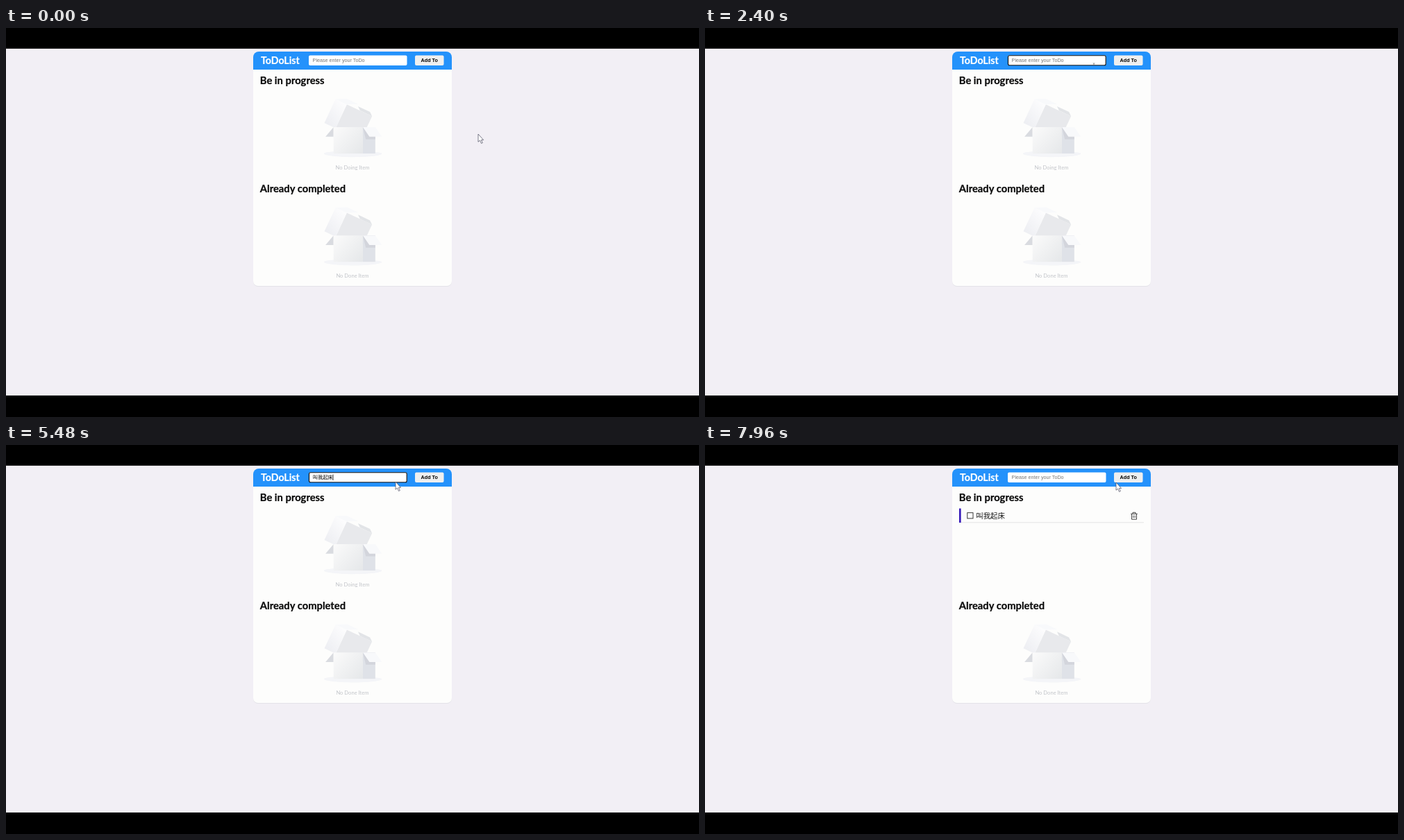
Animation, 998 px wide and 561 px high, one loop 8 s. Source, as an HTML page:

```html
<!DOCTYPE html>
<html lang="en">
<head>
<meta charset="utf-8">
<title>ToDoList</title>
<style>
  html, body { margin: 0; width: 100%; height: 100%; overflow: hidden; background: #000; }
  svg { display: block; width: 100vw; height: 100vh; }
  .title { font: 700 14.2px Lato, sans-serif; fill: #fff; stroke: #fff; stroke-width: .2; }
  .heading { font: 700 14.75px Lato, sans-serif; fill: #0a0a0a; stroke: #0a0a0a; stroke-width: .2; }
  .empty { font: 7.6px Lato, sans-serif; fill: #c3c5ca; text-anchor: middle; }
  .field { font: 7.2px "Liberation Sans", "Noto Sans CJK SC", "Noto Sans CJK", sans-serif; }
  .button { font: 700 7.2px "Liberation Sans", sans-serif; text-anchor: middle; }
  .task { font: 500 10.4px "Noto Sans CJK SC", "Noto Sans CJK", sans-serif; fill: #111; }
</style>
</head>
<body>
<svg viewBox="0 0 998 561">
  <defs>
    <linearGradient id="lidSide" x1=".39" y1="0" x2=".61" y2="1">
      <stop stop-color="#fcfcfd"/><stop offset="1" stop-color="#eeeff3"/>
    </linearGradient>
    <linearGradient id="front" x1="0" y1=".095" x2="1" y2=".905">
      <stop stop-color="#fafafa"/><stop offset="1" stop-color="#e6e8ea"/>
    </linearGradient>
    <clipPath id="inside"><rect x="437" y="40.5" width="140" height="12.5"/></clipPath>
    <g id="box">
      <path d="M39.5 86C61.3 86 79 83.9 79 81.3S57.3 78 35.5 78 0 78.8 0 81.3 17.7 86 39.5 86Z" fill="#f4f5f8"/>
      <path d="M13 45V58H2Z" fill="#d9dbe0"/>
      <g transform="translate(34.5 31.5) scale(-1 1) rotate(-25) translate(-27.5 -21.5)">
        <path d="M0 7H18L23 3H5Z" fill="#e2e4e7"/>
        <path d="M0 7H38V43H0Z" fill="#e8e9ec"/>
        <path d="M38 7H55V43H38Z" fill="url(#lidSide)"/>
        <path d="M55 7H38L24 0H41Z" fill="#f8f9fb"/>
      </g>
      <path d="M13 45H53V81H13Z" fill="url(#front)"/>
      <path d="M53 45H70V81H53Z" fill="#dfe2e8"/>
      <path d="M53 45H70V61.5H57Z" fill="#d3d5dc"/>
      <path d="M53 45H70L79 58H62Z" fill="#f8f9fb"/>
    </g>
  </defs>

  <rect width="998" height="561"/>
  <rect y="29.8" width="998" height="500.2" fill="#f2eff5"/>
  <rect x="356" y="35" width="286" height="338" rx="7" fill="#e4e3e8"/>
  <rect x="356" y="34" width="286" height="338" rx="7" fill="#fdfdfc"/>
  <path d="M356 60V42a8 8 0 0 1 8-8H634a8 8 0 0 1 8 8V60Z" fill="#2492fb"/>
  <text class="title" x="367" y="52">ToDoList</text>

  <rect x="436" y="39.5" width="141.5" height="14.5" rx="2" fill="#fff"/>
  <rect id="ring" x="436.5" y="39.7" width="140.7" height="14" rx="2" fill="none" stroke="#101010" stroke-width="1.15"/>
  <text id="placeholder" class="field" x="441.6" y="49.3" fill="#757575">Please enter your ToDo</text>
  <text id="typed" class="field" x="441.8" y="49.3"></text>
  <rect id="caret" y="42.5" width=".8" height="8.5"/>

  <rect x="589" y="39.5" width="41.5" height="14.5" rx="2" fill="#efefef"/>
  <text class="button" x="609.7" y="49.4">Add To</text>

  <text class="heading" x="365.8" y="80.5">Be in progress</text>
  <g id="noDoing">
    <use href="#box" transform="translate(458 95.5) scale(1.055)"/>
    <text class="empty" x="499" y="203.6">No Doing Item</text>
  </g>
  <g id="item">
    <path d="M368 111.8H632" stroke="#e1e1e1" stroke-width=".9"/>
    <rect x="366" y="91.5" width="2.6" height="20.5" fill="#3519b8"/>
    <rect x="377.8" y="97.7" width="8.2" height="8.2" fill="#fff" stroke="#222" stroke-width=".9"/>
    <text class="task" x="390.3" y="105.9">叫我起床</text>
    <path d="M613.2 99.3H622.8M616 99V97.3H620V99M614.5 99.5V107.2H621.5V99.5M616.8 101.5V105M619.2 101.5V105" fill="none" stroke="#333" stroke-width=".9"/>
  </g>
  <text class="heading" x="365.8" y="236.6">Already completed</text>
  <use href="#box" transform="translate(458 251.8) scale(1.055)"/>
  <text class="empty" x="499" y="359.8">No Done Item</text>

  <path id="arrow" d="M0 0V11.2L2.5 9 4.5 13.4 6.3 12.6 4.4 8.4H7.6Z" fill="#fff" stroke="#45455a" stroke-width=".7"/>
  <g clip-path="url(#inside)">
    <path id="beam" d="M-1.5-5H1.5M0-5V5M-1.5 5H1.5" fill="none" stroke="#777" stroke-width=".8"/>
  </g>
  <path id="hand" d="M-1 1Q0-.6 1 1V4.3L4.7 5.2Q5.6 5.6 5.4 7L4.6 11H-.6L-3.4 7.2Q-3.2 5.6-1 7Z" fill="#fff" stroke="#45455a" stroke-width=".7"/>
</svg>
<script>
  const LOOP = 8000, FOCUS = 900, BLUR = 6760, ADDED = 6840, BLINK = 500;
  const $ = id => document.getElementById(id);
  const show = (id, on) => $(id).setAttribute('visibility', on ? 'visible' : 'hidden');

  // time, x, y of the pointer
  const path = [
    [0, 680, 153], [160, 680, 153], [800, 560, 50], [1000, 543, 47], [1700, 543, 47],
    [2200, 560, 56], [2460, 560, 56], [2500, 561, 53], [5920, 561, 53],
    [6500, 592, 47], [6720, 593, 49.5], [7600, 593, 49.5], [7760, 592, 54]
  ];

  // time, field content
  const typing = [
    [0, ''], [FOCUS, ''], [2900, 'j'], [3040, 'ji'], [3180, 'jia'], [3320, 'jiao'], [3760, '叫'],
    [4240, '叫w'], [4360, '叫wo'], [4600, '叫我'], [4760, '叫我q'], [4840, '叫我qi'],
    [4920, "叫我qi'c"], [5000, "叫我qi'ch"], [5080, "叫我qi'chu"], [5160, "叫我qi'chuang"],
    [5320, '叫我起床'], [ADDED, '']
  ];

  const lastBefore = (list, t) => list.filter(entry => entry[0] <= t).pop();

  function pointerAt(t) {
    const from = lastBefore(path, t), to = path[path.indexOf(from) + 1];
    if (!to) return from.slice(1);
    const p = (t - from[0]) / (to[0] - from[0]), eased = p * p * (3 - 2 * p);
    return [1, 2].map(i => from[i] + (to[i] - from[i]) * eased);
  }

  function pointerKind(t, x, y) {
    if (x >= 589 && x <= 630 && y < 53) return 'hand';
    return x < 577 && (y < 53 || (t > 1700 && t < 2480)) ? 'beam' : 'arrow';
  }

  function draw(t) {
    const focused = t >= FOCUS && t < BLUR;
    const [editTime, value] = lastBefore(typing, t);
    show('ring', focused);
    show('placeholder', !value);
    $('typed').textContent = value;
    $('caret').setAttribute('x', 441.8 + (value ? $('typed').getComputedTextLength() : 0));
    show('caret', focused && (t - editTime) % (2 * BLINK) < BLINK);
    show('noDoing', t < ADDED);
    show('item', t >= ADDED);

    const [x, y] = pointerAt(t), kind = pointerKind(t, x, y);
    for (const id of ['arrow', 'beam', 'hand']) {
      show(id, id === kind);
      $(id).setAttribute('transform', `translate(${x} ${y})`);
    }
  }

  const start = performance.now();
  function tick() {
    draw((performance.now() - start) % LOOP);
    requestAnimationFrame(tick);
  }
  tick();
</script>
</body>
</html>
```
